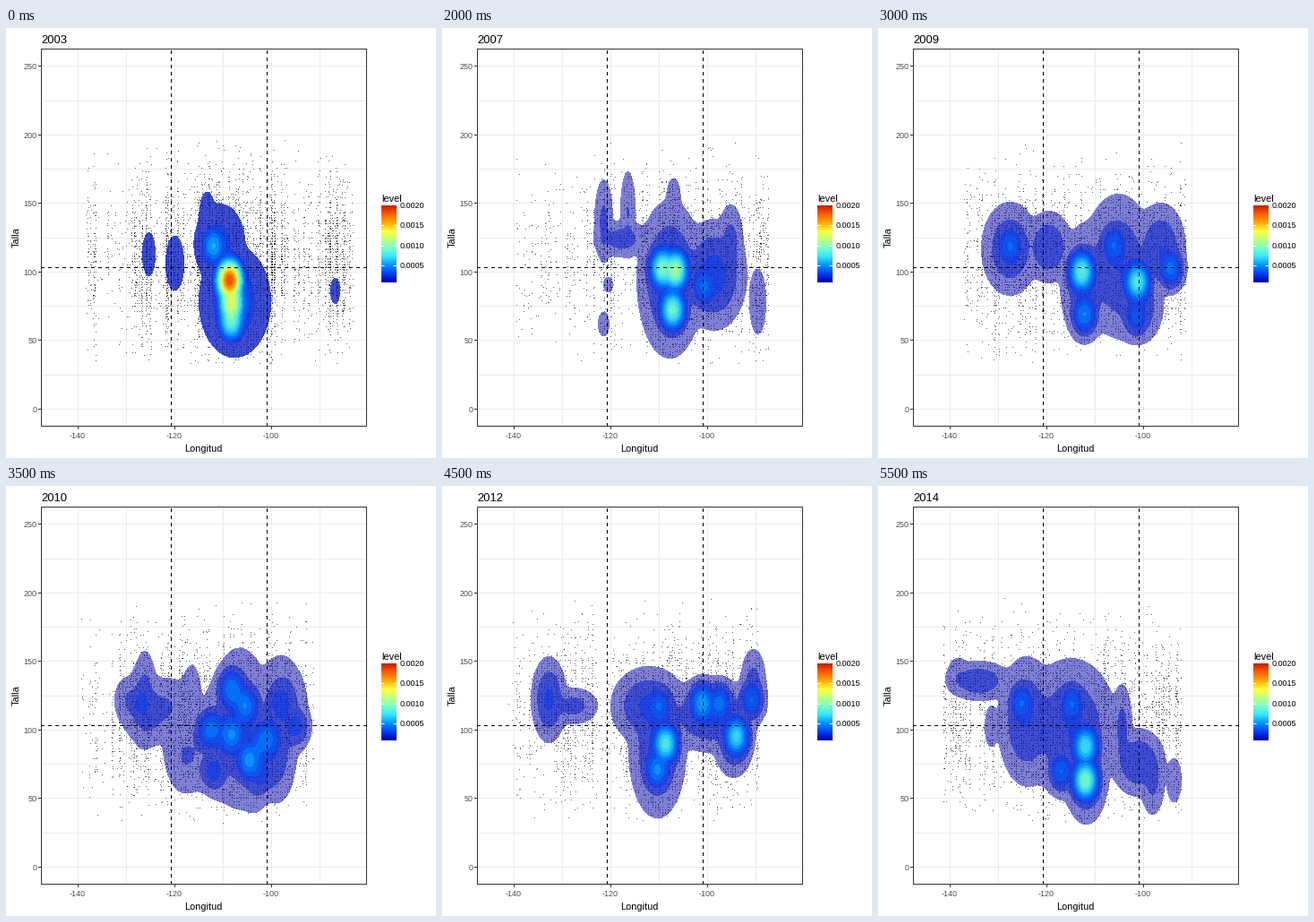
Animation of 480 by 480 pixels, one loop 6 s. Source, as a matplotlib script:

```python
import numpy as np
import matplotlib.pyplot as plt
from matplotlib.animation import FuncAnimation
from matplotlib.colors import LinearSegmentedColormap
from matplotlib.patches import Rectangle

PX = 0.9  # points per pixel at 80 dpi
GX, GY = np.meshgrid(np.arange(55, 400), np.arange(140, 400))
KERNEL = 10, 16  # width and height of a hot spot
CMAP = LinearSegmentedColormap.from_list("level", [
    "#0000AA", "#0040F8", "#0094FF", "#38E4FF", "#78FFC8",
    "#BFFF80", "#FFFF40", "#FFAA00", "#FF6000", "#C81E00"])
YEARS = range(2003, 2015)
surveys = {}


def px_x(lon):
    return 80.5 + 5.4 * (lon + 140)


def px_y(size):
    return 425.5 - 1.531 * size


def survey(year, span, dots, cap, bodies, spots, base=1):
    """Bodies are ellipses (x, y, rx, ry) whose rim lies on level 1, spots are
    (x, y, peak); levels up to base share the rim."""
    total = 0
    for x, y, rx, ry in bodies:
        core = min(cap, 1.3 + rx * ry / 500)
        total += (core * core ** -(((GX - x) / rx)**2 + ((GY - y) / ry)**2)) ** 4
    for x, y, peak in spots:
        r2 = ((GX - x) / KERNEL[0])**2 + ((GY - y) / KERNEL[1])**2
        total += (peak * np.exp(-r2 / 2)) ** 4
    surveys[year] = dict(span=span, dots=dots, base=base, field=total ** 0.25)


survey(2003, (88, 386), 5200, 5, base=2,
       bodies=[(238, 240, 28, 44), (255, 305, 40, 62), (224, 205, 8, 22),
               (159, 252, 7, 24), (188, 262, 10, 30), (367, 293, 5, 14)],
       spots=[(249, 281, 20), (251, 306, 14), (251, 326, 10.5), (231, 243, 7)])

survey(2005, (110, 384), 3600, 5.5, base=2,
       bodies=[(238, 293, 40, 66), (275, 298, 28, 54), (288, 345, 10, 15),
               (222, 251, 20, 24), (237, 222, 4, 12)],
       spots=[(235, 281, 16), (237, 306, 18.5), (278, 299, 8.5), (257, 318, 8.5), (225, 265, 7)])

survey(2007, (82, 363), 2300, 3.5,
       bodies=[(254, 280, 37, 88), (303, 275, 37, 62), (322, 237, 13, 40), (352, 305, 9, 36),
               (200, 235, 30, 20), (207, 205, 8, 45), (180, 215, 10, 46),
               (258, 188, 7, 20), (185, 286, 5, 8), (180, 330, 6, 13)],
       spots=[(246, 268, 11), (260, 270, 12), (257, 314, 10.5), (292, 288, 5.2)])

survey(2009, (93, 342), 2300, 3,
       bodies=[(147, 246, 32, 52), (190, 244, 26, 40), (230, 285, 27, 66),
               (268, 265, 40, 80), (290, 310, 28, 42), (315, 245, 28, 50)],
       spots=[(147, 243, 5), (227, 272, 10), (289, 283, 9.5), (230, 319, 6),
              (288, 322, 4.3), (326, 268, 5.4), (263, 242, 5)])

survey(2011, (82, 348), 3000, 3.5,
       bodies=[(257, 274, 32, 100), (276, 315, 20, 58), (305, 270, 24, 92), (196, 303, 26, 52),
               (155, 230, 11, 58), (166, 252, 20, 38), (133, 236, 8, 13), (208, 228, 9, 44)],
       spots=[(251, 226, 9.8), (251, 277, 10), (271, 306, 10.5), (268, 246, 7.4), (304, 240, 4.6)])

survey(2012, (72, 354), 2800, 3.2,
       bodies=[(240, 295, 32, 75), (230, 245, 42, 44), (300, 255, 52, 42), (325, 285, 22, 40),
               (347, 220, 14, 38), (119, 238, 20, 48), (146, 245, 27, 20)],
       spots=[(249, 287, 9.5), (240, 316, 6.2), (242, 246, 5), (290, 242, 7),
              (309, 242, 5.5), (328, 279, 8.5), (345, 238, 5)])

survey(2014, (72, 337), 2700, 3,
       bodies=[(215, 270, 52, 78), (232, 325, 24, 52), (165, 262, 32, 72), (112, 217, 36, 22),
               (89, 210, 11, 18), (126, 268, 7, 22), (272, 270, 11, 48), (290, 308, 30, 38),
               (306, 328, 13, 38), (330, 328, 8, 24)],
       spots=[(231, 328, 11), (231, 290, 9), (216, 243, 5), (160, 242, 5), (204, 318, 5)])


def blend(a, b):
    return dict(span=(min(a["span"][0], b["span"][0]), min(a["span"][1], b["span"][1])),
                dots=(a["dots"] + b["dots"]) // 2, base=min(a["base"], b["base"]),
                field=(a["field"] + b["field"]) / 2)


def scatter_dots(s, rng):
    """Dots gather on half-degree columns, in whole sizes, thickest inside the rim."""
    cols = np.arange(*s["span"], 2.7)
    column_peak = s["field"].max(axis=0)[cols.astype(int) - 55]
    weight = (rng.random(len(cols)) ** 2 + 0.05) * (0.3 + np.minimum(column_peak, 1))
    n = s["dots"]
    x = rng.choice(cols, n, p=weight / weight.sum()) + rng.integers(0, 2, n)
    y = rng.normal(258, 46, n)
    y = np.where((y < 125) | (y > 376), rng.uniform(170, 350, n), y)
    lx, ly = (v.ravel() for v in np.meshgrid(np.arange(62, 398, 2.7), np.arange(142, 398, 1.531)))
    inside = s["field"][ly.astype(int) - 140, lx.astype(int) - 55] > 1
    keep = inside & (rng.random(len(lx)) < 0.4 + 0.1 * (s["base"] - 1))
    x, y = np.append(x, lx[keep]), np.append(y, ly[keep])
    return np.floor(x) + 0.5, np.floor(px_y(np.round((425.5 - y) / 1.531))) + 0.5


for year in YEARS:
    if year not in surveys:
        surveys[year] = blend(surveys[year - 1], surveys[year + 1])
    surveys[year]["points"] = scatter_dots(surveys[year], np.random.default_rng(year))

plt.rcParams["font.family"] = "Liberation Sans"
fig = plt.figure(figsize=(6, 6), dpi=80, facecolor="white")
ax = fig.add_axes([0, 0, 1, 1])
ax.axis("off")


def line(x, y, colour, z, **kw):
    ax.plot(x, y, color=colour, lw=PX, zorder=z, solid_capstyle="butt", snap=False, **kw)


def label(x, y, text, size, colour="black", **kw):
    return ax.text(x, y, text, fontsize=size * PX, color=colour, **kw)


def centre(v):
    return np.floor(v) + 0.5


for lon in range(-140, -89, 10):
    x = centre(px_x(lon))
    line([x, x], [23, 445], "#EBEBEB", 0)
    if lon % 20 == 0:
        line([x, x], [445, 448], "#333333", 4)
        label(x - 0.5, 458.5, str(lon), 9, "#4D4D4D", ha="center")
for size in range(0, 251, 25):
    y = centre(px_y(size))
    line([39, 402], [y, y], "#EBEBEB", 0)
    if size % 50 == 0:
        line([36, 39], [y, y], "#333333", 4)
        label(34.5, y + 3.5, str(size), 9, "#4D4D4D", ha="right")

dashes = dict(ls=(0, (4, 4)), dash_capstyle="butt")
for x in (184.5, 291.5):
    line([x, x], [445, 23], "black", 3, **dashes)
line([39, 402], [267.5, 267.5], "black", 3, **dashes)
ax.add_patch(Rectangle((39.5, 23.5), 363, 421, fill=False, ec="#333333", lw=PX,
                       zorder=4, snap=False))

title = label(39, 17, "", 13)
label(220.5, 473, "Longitud", 11, ha="center")
label(12, 234, "Talla", 11, ha="center", va="center", rotation=90)
label(419, 194, "level", 11)
ax.imshow(np.linspace(1, 0, 256)[:, None], cmap=CMAP, extent=(419, 436, 284, 198),
          aspect="auto", zorder=1)
for v in (5, 10, 15, 20):
    y = centre(284 - 86 * (v - 1) / 19)
    label(440, y + 2.5, f"{v / 1e4:.4f}", 9)
    if v < 20:
        line([419, 422.5], [y, y], "white", 2)
        line([432.5, 436], [y, y], "white", 2)

dots, = ax.plot([], [], ",", color="black", alpha=0.6, zorder=1)
ax.set(xlim=(0, 480), ylim=(480, 0), autoscale_on=False)
layers = []


def update(i):
    while layers:
        layers.pop().remove()
    s = surveys[YEARS[i]]
    title.set_text(str(YEARS[i]))
    dots.set_data(*s["points"])
    for v in range(1, int(s["field"].max()) + 1):
        rim = 1 if v <= s["base"] else v
        layers.append(ax.contourf(GX + 0.5, GY + 0.5, s["field"], levels=[rim, 1000],
                                  colors=[CMAP((v - 1) / 19)], alpha=0.5, zorder=2))
    return []


anim = FuncAnimation(fig, update, frames=len(YEARS), interval=500, repeat=True, repeat_delay=0)
plt.show()
```
